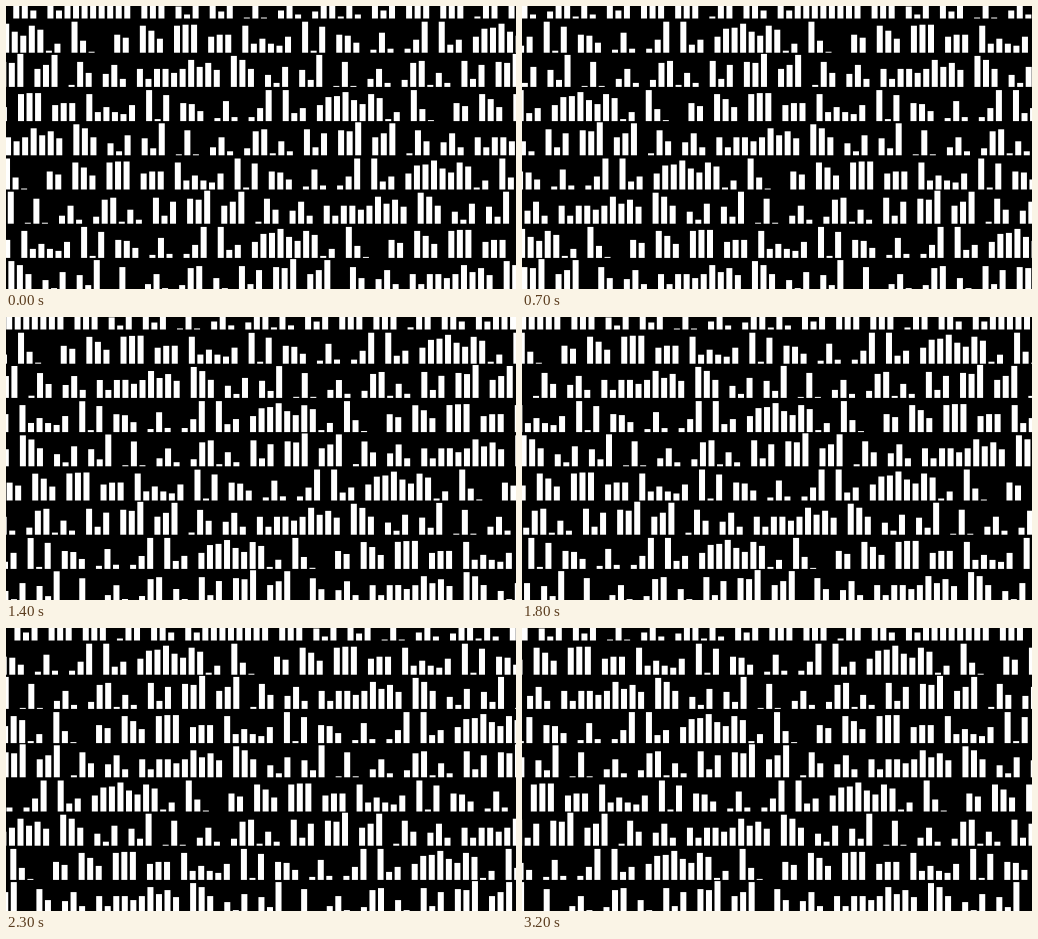
Write an HTML page with a canvas that moves like this. It is 510 by 283 pixels and loops after 3.3 s.

```html
<!DOCTYPE html>
<html lang="en">
<head>
<meta charset="utf-8">
<title>Bar stream</title>
<style>
  html, body { margin: 0; width: 100%; height: 100%; overflow: hidden; background: #000; }
  canvas { display: block; width: 510px; height: 283px; }
</style>
</head>
<body>
<canvas id="stage" width="510" height="283"></canvas>
<script>
const ctx = document.getElementById('stage').getContext('2d');
const W = 510, H = 283, LOOP = 3300, STEP = 100;
const PITCH = 8.54, BAR = 6, ROW_GAP = 34.2, FIRST_BASE = 12.5;

// Bar heights grouped in words; one empty slot follows each word.
const flatten = words => words.flatMap(w => [...w, 0]);
const evenLine = flatten([
  [27, 28, 28], [16, 18, 18], [27, 9, 14, 9, 7, 16], [31, 2, 26],
  [18, 17, 10], [3, 20, 4], [4, 13, 31], [31, 8, 13],
  [16, 24, 25, 29, 21, 17, 27, 23, 2, 9], [31, 12, 1, 0], [18, 15], [27, 22, 14]
]);
const oddLine = flatten([
  [8, 18, 4], [7, 24, 26, 2, 14, 4], [26, 8, 22], [25, 24, 33],
  [18, 22, 32], [2, 25, 14], [13, 22, 8],
  [18, 8, 18, 18, 14, 18, 27, 20, 24, 17], [31, 27, 18],
  [12, 4, 20], [17, 7, 32], [1, 25, 1]
]);
const SLOTS = evenLine.length;

// Where each line begins, and scroll speed in px per step.
const starts = [272, 168, 361.5, 12, 204, 100.5, 53, -53, 139];
const speeds = [4.775, 3.82, 2.865];

const wrap = i => ((i % SLOTS) + SLOTS) % SLOTS;

// Heights morph between the line and itself half a turn along, twice per loop.
function mixAt(step) {
  const swing = -Math.cos(step / (LOOP / STEP) * 4 * Math.PI);
  return 0.5 + 0.5 * Math.tanh(5 * swing + 0.4);
}

function drawRow(row, step, mix) {
  const line = row % 2 ? evenLine : oddLine;
  const x0 = starts[row] - speeds[row % 3] * step;
  const base = FIRST_BASE + ROW_GAP * row;
  const first = Math.floor(-x0 / PITCH) - 1;
  for (let i = first; x0 + i * PITCH < W; i++) {
    const a = line[wrap(i)], b = line[wrap(i + SLOTS / 2)];
    const h = a + (b - a) * mix;
    if (h > 0.4) ctx.fillRect(x0 + i * PITCH, base - h, BAR, h);
  }
}

function draw(now) {
  const step = Math.floor((now % LOOP) / STEP);
  const mix = mixAt(step);
  ctx.fillStyle = '#000';
  ctx.fillRect(0, 0, W, H);
  ctx.fillStyle = '#fff';
  starts.forEach((_, row) => drawRow(row, step, mix));
}

const begin = performance.now();
function tick() {
  draw(performance.now() - begin);
  requestAnimationFrame(tick);
}
tick();
</script>
</body>
</html>
```
